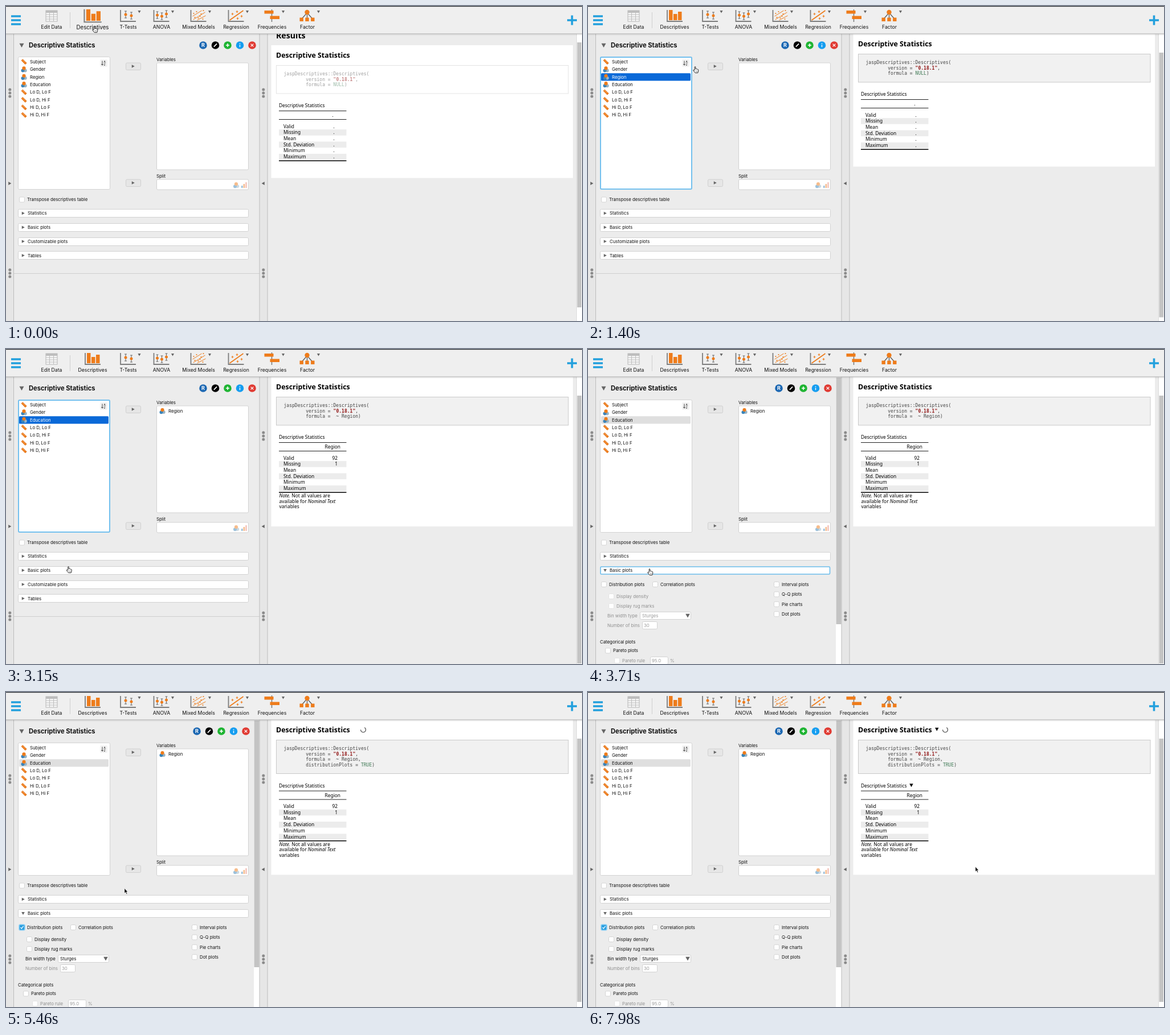
Animation of 1011x554 px, one loop 8 s. Source, as an HTML page:

```html
<!DOCTYPE html>
<html lang="en">
<head>
<meta charset="utf-8">
<title>Descriptive statistics</title>
<style>
  html, body { margin: 0; width: 100%; height: 100%; overflow: hidden; background: #ececec; }
  svg { display: block; width: 1011px; height: 554px; }
  text { font: 7.8px Inter, sans-serif; fill: #111; white-space: pre; }
  .tool { font-size: 8.7px; text-anchor: middle; }
  .head { font-size: 11.2px; font-weight: 700; }
  .res { font: 8.35px "Noto Sans", sans-serif; fill: #000; }
  .title { font: 700 12.4px "Noto Sans", sans-serif; fill: #000; }
  .code { font: 8.04px "DejaVu Sans Mono", monospace; fill: #444; }
  .end { text-anchor: end; }
  .mid { text-anchor: middle; }
</style>
</head>
<body>
<svg viewBox="0 0 1011 554">
  <g id="results"></g>
  <g id="panel"></g>
  <g id="chrome"></g>
  <g id="cursor"></g>
</svg>
<script>
const LOOP = 8000, STEP = 70;
const ORANGE = '#ee7c1b', GREY = '#7d7d7d', BLUE = '#23a0dd';
const $ = id => document.getElementById(id);

const rect = (x, y, w, h, fill, more = '') =>
  `<rect x="${x}" y="${y}" width="${w}" height="${h}" fill="${fill}" ${more}/>`;
const text = (x, y, s, cls = '', more = '') =>
  `<text x="${x}" y="${y}" class="${cls}" ${more}>${s}</text>`;
const path = (d, stroke, width = 1, fill = 'none', more = '') =>
  `<path d="${d}" stroke="${stroke}" stroke-width="${width}" fill="${fill}" ${more}/>`;
const circle = (x, y, r, fill) => `<circle cx="${x}" cy="${y}" r="${r}" fill="${fill}"/>`;
const group = (body, more) => `<g ${more}>${body}</g>`;
const move = (x, y, body) => group(body, `transform="translate(${x} ${y})"`);
const field = (x, y, w, h) => rect(x + .5, y + .5, w - 1, h - 1, '#fff', 'rx="2" stroke="#d2d2d2"');
const label = (x, mid, s) => text(x, mid + 2.8, s);
const dim = (body, on) => group(body, `opacity="${on ? 1 : .42}"`);

const ARROWS = {
  down: 'M-1 -.8H1L0 1Z', up: 'M-1 .8H1L0 -1Z', right: 'M-.8 -1V1L1 0Z', left: 'M.8 -1V1L-1 0Z'
};
const arrow = (x, y, dir, size = 3.2, fill = '#666') =>
  `<path d="${ARROWS[dir]}" fill="${fill}" transform="translate(${x} ${y}) scale(${size})"/>`;

const smooth = p => p * p * (3 - 2 * p);
const ramp = (t, a, b) => smooth(Math.min(1, Math.max(0, (t - a) / (b - a))));

// ---------- toolbar icons, centred on x = 0 ----------
const axes = path('M-13 7V27H14', GREY, 1.8);
const whisker = (x, y) =>
  path(`M${x} ${y - 6}V${y + 6}M${x - 2} ${y - 6}h4M${x - 2} ${y + 6}h4`, '#666') + circle(x, y, 2.5, ORANGE);
const dots = points => points.map(([x, y]) => circle(x, y, 1.1, ORANGE)).join('');
const plus = (x, y) => path(`M${x - 2} ${y}h4M${x} ${y - 2}v4`, ORANGE, 1.2);

function tableIcon() {
  let s = rect(-10, 8, 20, 19, '#f6f6f6', 'stroke="#b5b5b5"') + rect(-10, 8, 20, 4, '#bdbdbd');
  for (let y = 15; y < 27; y += 4) s += path(`M-10 ${y}H10`, '#bdbdbd');
  return s + path('M-3.5 8V27M3.5 8V27', '#bdbdbd');
}
const barsIcon = axes + rect(-10, 7, 6.5, 18, ORANGE) + rect(-2, 14, 6.5, 11, ORANGE) + rect(6, 10, 6.5, 15, ORANGE);
const mixedIcon = axes + path('M-10 18L6 8M-9 24L12 11M-2 25L13 17', ORANGE, 1) +
  dots([[-8, 13], [-3, 10], [0, 21], [5, 14], [9, 8], [8, 23], [-6, 20], [3, 18]]);
const regressionIcon = axes + path('M-11 25L13 8', ORANGE, 1.7) + plus(-6, 14) + plus(2, 10) + plus(3, 22) + plus(10, 18);
const frequencyIcon = path('M0 6V28', '#777', 1.5) + rect(-13, 8, 16, 5.5, ORANGE) + rect(-3, 17.5, 16.5, 5.5, ORANGE);
const factorIcon = path('M0 12L-9 22M0 12V22M0 12L9 22', '#555', 1.2) + circle(0, 11, 4.2, ORANGE) +
  [-13, -3.2, 6.6].map(x => rect(x, 20.5, 6.4, 6.4, ORANGE)).join('');

const TOOLS = [
  [80, 'Edit Data', tableIcon()], [152, 'Descriptives', barsIcon],
  [214.5, 'T-Tests', axes + whisker(-4, 15) + whisker(6, 17)],
  [273, 'ANOVA', axes + whisker(-7, 16) + whisker(1, 18) + whisker(9, 14)],
  [338, 'Mixed Models', mixedIcon], [404, 'Regression', regressionIcon],
  [467, 'Frequencies', frequencyIcon], [529, 'Factor', factorIcon]
];

function drawChrome(hover) {
  let s = rect(0, 0, 1011, 49, '#efefef') + rect(0, 0, 1011, 1.2, '#252a30') +
    rect(0, 48.3, 1011, 1, '#b5b5b5') + rect(0, 49.3, 1011, 2, '#000', 'opacity=".08"') +
    path('M9 18H26M9 25H26M9 32H26', BLUE, 3.4) +
    path('M985 25H1002M993.5 16.5V33.5', BLUE, 3.6) + path('M112.5 11V39', '#cfcfcf');
  TOOLS.forEach(([x, name, icon], i) => {
    const big = hover && i === 1;
    s += group(icon, `transform="translate(${x - (i > 1 ? .5 : 0)} ${big ? -2 : 0}) scale(${big ? 1.12 : 1})"`);
    s += text(x, big ? 41 : 39.7, name, 'tool', big ? 'style="font-size:9.7px"' : '');
    if (i > 1) s += arrow(x + 19.5, 10, 'down', 2.6);
  });
  return s;
}

// ---------- left panel ----------
const ruler = (x, y) => move(x, y,
  path('M-4.6 -2.2L-2.2 -4.6L4.8 2.2L2.3 4.7Z', '#d96a10', .6, ORANGE) +
  path('M-1.6 -3.4l-1 1M.2 -1.7l-1 1M2 0l-1 1', '#fff', .6));
const nominal = (x, y) => circle(x + 2.2, y + 2, 3, '#9ab4c4') + circle(x - 2, y + 2.2, 3, '#3c84b8') +
  circle(x, y - 2, 3.1, ORANGE);

function variables(moved, focus) {
  const names = ['Subject', 'Gender', 'Region', 'Education', 'Lo D, Lo F', 'Lo D, Hi F', 'Hi D, Lo F', 'Hi D, Hi F']
    .filter(n => !(moved && n === 'Region'));
  let s = field(21, 89, 162, 234);
  if (focus === 'list') s += rect(22, 90, 160, 232, '#fff', 'rx="2" stroke="#74c0ee" stroke-width="2"');
  names.forEach((name, i) => {
    const y = 98 + 13.38 * i, picked = focus && i === 2, blue = picked && focus === 'list';
    if (picked) s += rect(23, y - 6.4, 157, 13.2, blue ? '#0a69d8' : '#dfdfdf', 'rx="1.5"');
    s += /^(Gender|Region|Education)$/.test(name) ? nominal(31.5, y) : ruler(31.5, y);
    s += text(42, y + 2.8, name, '', blue ? 'style="fill:#fff"' : '');
  });
  return s + rect(165, 94, 13, 13, '#f2f2f2', 'rx="2"') + path('M169 96.5V104M167.2 102L169 104.2L170.8 102', '#333', .9) +
    text(171.6, 100, 'A', '', 'style="font-size:5px"') + text(171.6, 105, 'Z', '', 'style="font-size:5px"');
}

const button = y => rect(210.5, y - 6, 26, 12.5, '#e6e6e6', 'rx="2" stroke="#d0d0d0"') + arrow(223, y, 'right', 2.8);

function check(x, y, name, on, checked) {
  const box = checked
    ? rect(x - 5, y - 5, 10, 10, '#2a9fe0', 'rx="2" stroke="#8fd0f4" stroke-width="1.6"') +
      path(`M${x - 2.5} ${y}L${x - .7} ${y + 2}L${x + 2.7} ${y - 2.4}`, '#fff', 1.2)
    : rect(x - 4.5, y - 4.5, 9, 9, '#fff', `rx="2" stroke="${on ? '#d4d4d4' : '#e2e2e2'}"`);
  return box + dim(label(x + 9, y, name), on);
}

function section(mid, name, open, focus) {
  const top = Math.floor(mid - 7);
  const edge = focus ? rect(22, top + 1, 402.5, 13, '#fff', 'rx="1.5" stroke="#6cbdec" stroke-width="1.6"')
    : field(21, top, 405, 15);
  return edge + arrow(30, mid, open ? 'down' : 'right', 2.8) + label(38, mid, name);
}

function basicPlots(on) {
  return check(28, 414, 'Distribution plots', true, on) + check(118, 414, 'Correlation plots', true) +
    ['Interval plots', 'Q-Q plots', 'Pie charts', 'Dot plots']
      .map((n, i) => check(331, 414 + 17.4 * i, n, true)).join('') +
    check(41, 435, 'Display density', on) + check(41, 452, 'Display rug marks', on) +
    dim(label(34, 469, 'Bin width type'), on) + field(91, 462, 90, 14) +
    dim(label(95, 469, 'Sturges'), on) + arrow(175, 468.8, 'down', 3.8) +
    dim(label(34, 486.5, 'Number of bins'), false) + field(95, 479, 27, 14) + dim(label(98, 486.5, '30'), false) +
    label(21, 515, 'Categorical plots') + check(35, 530.5, 'Pareto plots', true) +
    check(51, 548, 'Pareto rule', false) + field(109, 541, 32, 14) +
    dim(label(112, 548, '95.0') + label(144, 548, '%'), false);
}

function strip(x, dir) {
  const w = x ? 14 : 13.5;
  let s = rect(x, 49, w, 505, '#e6e6e6') + path(`M${x + w} 49V554${x ? `M${x} 49V554` : ''}`, '#bcbcbc');
  for (const y of [147, 153, 159, 464, 470, 476]) s += circle(x + 6.8, y, 2.5, '#8b8b8b');
  return s + arrow(x + 6.5, 312, dir, 2.9);
}

function drawPanel(t) {
  const moved = t >= 1890, open = t >= 3220, checked = t >= 4480;
  const grow = 260 * ramp(t, 3150, 3640), scrolls = grow > 70;
  const focus = open ? 'faded' : t >= 1120 ? 'list' : '';
  let s = rect(0, 49, 459, 505, '#ececec') + arrow(27.5, 69, 'down', 4) + text(40, 73, 'Descriptive Statistics', 'head');

  const shift = scrolls ? -11 : 0;
  ['#1b67b2', '#000', '#1eb432', '#159df0', '#e03a32'].forEach((c, i) => {
    const x = 346 + 21.5 * i + shift;
    s += circle(x, 69, 6.8, c);
    s += [
      text(x, 72.2, 'R', 'mid', 'style="fill:#fff;font-size:9px;font-weight:700"'),
      path(`M${x - 2.6} 71.6L${x + 2.6} 66.4`, '#fff', 1.7),
      path(`M${x - 3} 69h6M${x} 66v6`, '#fff', 1.6),
      path(`M${x} 68.2v4M${x} 65.4v1.5`, '#fff', 1.4),
      path(`M${x - 2.4} 66.6l4.8 4.8m0 -4.8l-4.8 4.8`, '#fff', 1.3)
    ][i];
  });

  s += variables(moved, focus) + button(106) + button(311) +
    label(264, 94, 'Variables') + field(264, 99.5, 162, 189) + label(264, 299, 'Split') + field(264, 304.5, 162, 19) +
    group(nominal(404, 315) + rect(413, 316, 2.6, 4, '#3c84b8') + rect(416.6, 313, 2.6, 7, ORANGE) +
      rect(420.2, 310, 2.6, 10, '#e88a7c'), 'opacity=".5"') +
    check(28, 340.5, 'Transpose descriptives table', true) +
    section(364.5, 'Statistics') + section(389.3, 'Basic plots', open, open && !checked);
  if (moved) s += nominal(274.5, 109) + label(285, 109, 'Region');
  if (grow) s += `<clipPath id="fold"><rect x="14" y="398" width="420" height="${grow}"/></clipPath>` +
    group(basicPlots(checked), 'clip-path="url(#fold)"');
  s += move(0, grow, section(414, 'Customizable plots') + section(438.7, 'Tables') + path('M14 470.5H445', '#cfcfcf'));
  if (scrolls) s += rect(435, 50, 10, 504, '#fff') + rect(435.5, 50, 9, 434, '#c3c3c3');
  return s + strip(0, 'right') + strip(445, 'left');
}

// ---------- results ----------
const span = (color, s, more = '') => `<tspan style="fill:${color};${more}">${s}</tspan>`;

function drawResults(t) {
  const region = t >= 2170, plots = t >= 4620;
  const shown = ramp(t, 0, 700), scroll = 20 * (1 - shown);
  const extra = plots ? 9.5 : 0, bottom = (region ? 312 : 282.5) + extra;
  const value = s => span('#3f7a55', s);
  const formula = region ? `~ Region${plots ? ',' : ')'}` : value('NULL') + ')';

  const lines = ['jaspDescriptives::Descriptives(',
    `        version = ${span('#8f1414', '"0.18.1"', 'font-weight:700')},`,
    `        formula = ${region ? ' ' : ''}${formula}`];
  if (plots) lines.push(`        distributionPlots = ${value('TRUE')})`);
  const code = rect(474.5, 84.5, 512.5, 49.5 + extra, `rgba(241,241,241,${shown})`, 'stroke="#c9c9c9"') +
    lines.map((l, i) => text(487.5, 102 + 9.5 * i, l, 'code')).join('');

  let table = text(479, 158.4, 'Descriptive Statistics', 'res') + path('M479 164.5H597.5M479 179.5H597.5', '#222') +
    (region ? text(587, 175.2, 'Region', 'res end') : text(573.5, 175, '.', 'res mid'));
  ['Valid', 'Missing', 'Mean', 'Std. Deviation', 'Minimum', 'Maximum'].forEach((name, i) => {
    const y = 191.6 + 10.7 * i;
    if (i % 2) table += rect(479, y - 5.2, 118.5, 10.6, '#ececec');
    table += text(487, y + 2.9, name, 'res');
    table += region ? text(582, y + 2.9, ['92', '1'][i] || '', 'res end') : text(575.5, y + 2.9, '.', 'res mid');
  });
  table += path('M479 252.2H597.5', '#000', 1.5);
  if (region) {
    const italic = s => `<tspan font-style="italic">${s}</tspan>`;
    [italic('Note.') + ' Not all values are', 'available for ' + italic('Nominal Text'), 'variables']
      .forEach((l, i) => { table += text(479.5, 261.3 + 9.5 * i, l, 'res'); });
  }
  if (t >= 6930) table += arrow(567.5, 154.5, 'down', 3.3, '#111');

  let card = text(474, 36.5, 'Results', 'title', 'style="font-size:14.2px"') + rect(465.5, 49, 529.5, bottom - 49, '#fff') +
    text(474, 70.7, 'Descriptive Statistics', 'title') +
    group(code, `opacity="${.5 + .5 * shown}"`) + move(0, extra, table);
  if (t >= 6790) card += arrow(612.3, 65.5, 'down', 3.3, '#111');
  if (plots) {
    const turn = 60 * Math.floor((t - 5460) / 140) + 60;
    card += group(path('M2.2 -3.9A4.5 4.5 0 1 0 2.2 3.9', '#555', 1.3),
      `transform="translate(627 66.3) rotate(${turn + 180})"`);
  }
  const top = 82 - 18 * (1 - shown);
  const end = plots ? 545 : region ? 553 : 547.5 - 17.5 * (1 - shown);
  return rect(459, 49, 552, 505, '#ececec') + move(0, scroll, card) +
    rect(1001.5, 49, 9.5, 505, '#fff') + path('M1001.5 49V554', '#d6d6d6', .8) +
    rect(1002.5, top, 7.5, end - top, '#c3c3c3');
}

// ---------- pointer: time, x, y ----------
const TRACK = [
  [0, 151, 35], [840, 100, 121], [1120, 100, 121], [1400, 184, 106], [1680, 216, 103], [2030, 216, 103],
  [2520, 131, 326], [2870, 105.5, 382], [3150, 105.5, 382], [3430, 104, 386], [3920, 104, 386],
  [4340, 82, 411], [5110, 82, 411], [5250, 156, 390], [5460, 207.5, 345], [5740, 212, 352], [6020, 212, 352],
  [6230, 522, 352], [6440, 522, 352], [6790, 628, 316], [7280, 680, 309], [7700, 679.5, 307], [LOOP, 679.5, 307]
];
const HAND = path('M3.2 6.8V1.6Q3.2 .6 4 .6T4.9 1.6V4.6Q6.2 3.9 6.7 5Q7.9 4.4 8.3 5.5Q9.7 5.2 9.7 6.7V8.6L8.7 11.6H4.2' +
  'L1 7.8Q.3 6.6 1.2 6.4T3.2 7.6', '#111', .9, '#fff', 'stroke-linejoin="round"') + path('M5 7.6V10M6.5 7.6V10M8 7.6V10', '#555', .5);
const POINTER = path('M.4 .2V9L2.4 7.2L3.9 10.6L5.4 9.9L3.9 6.7H6.4Z', '#fff', .7, '#000');

function drawCursor(t) {
  const i = TRACK.findIndex(k => k[0] > t);
  const [a, ax, ay] = TRACK[i - 1], [b, bx, by] = TRACK[i];
  const p = ramp(t, a, b);
  return move(ax + (bx - ax) * p, ay + (by - ay) * p, t < 5320 ? HAND : POINTER);
}

let last = -1;
function render(now) {
  const t = Math.floor(now % LOOP / STEP) * STEP;
  if (t !== last) {
    last = t;
    $('results').innerHTML = drawResults(t);
    $('panel').innerHTML = drawPanel(t);
    $('chrome').innerHTML = drawChrome(t < 210);
    $('cursor').innerHTML = drawCursor(t);
  }
}
const start = performance.now();
function tick() {
  render(performance.now() - start);
  requestAnimationFrame(tick);
}
tick();
</script>
</body>
</html>
```
